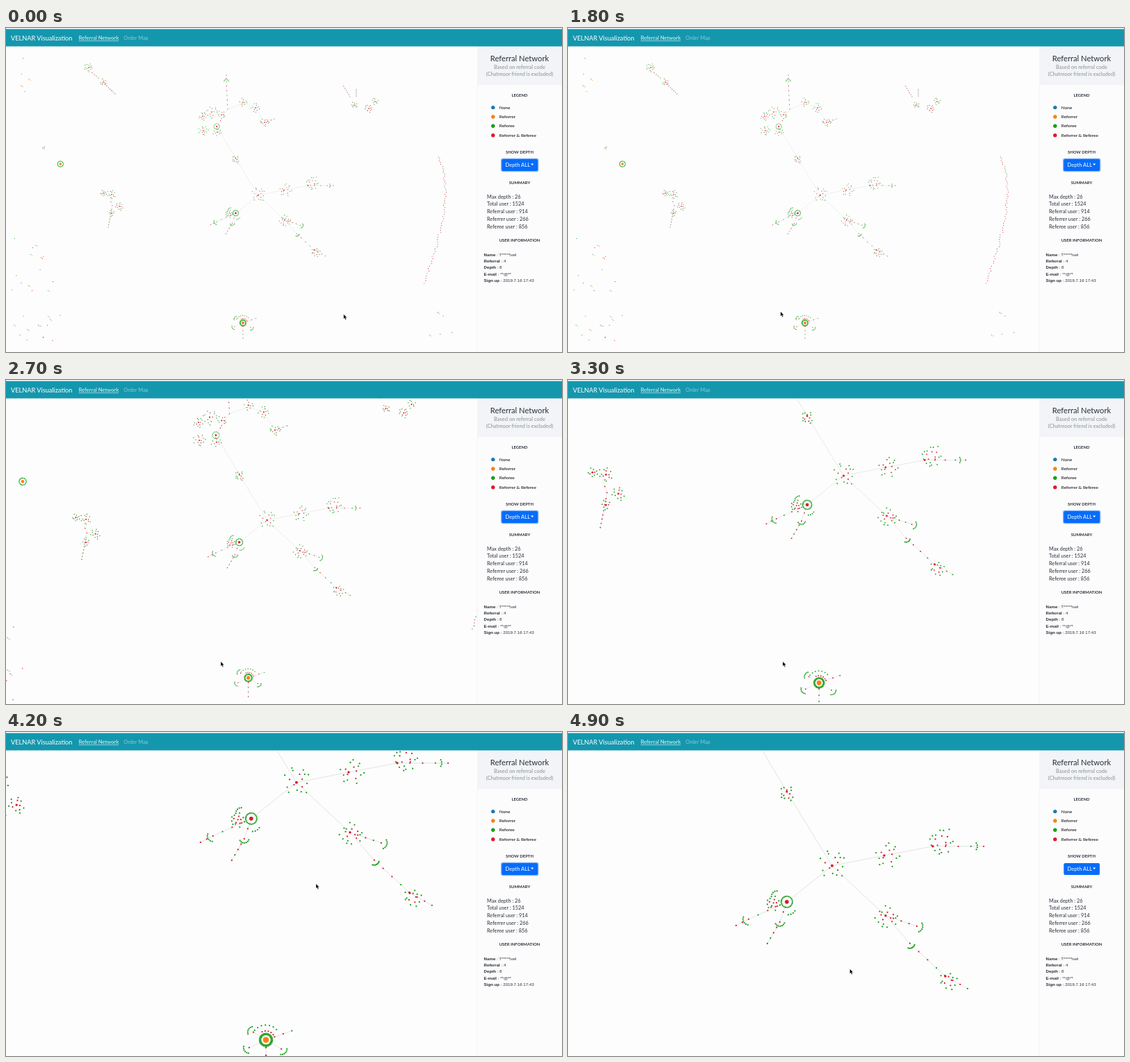
An HTML page for the animation above (5000 ms loop, 800x467 px).

```html
<!DOCTYPE html>
<html lang="en">
<head>
<meta charset="utf-8">
<title>Referral Network</title>
<style>
  html, body { margin: 0; width: 100%; height: 100%; overflow: hidden; background: #fff; }
  svg { display: block; width: 100%; height: 100%; }
  text { font-family: Lato, "Open Sans", sans-serif; fill: #2a2f38; white-space: pre; }
  .user text { font-family: "Liberation Sans", Arial, sans-serif; }
  .link { stroke: #d9d9d9; stroke-width: .36; }
</style>
</head>
<body>
<svg viewBox="0 0 800 467">
  <rect y="26" width="678" height="441" fill="#fdfdfd"/>
  <g id="network"><g id="links"></g><g id="nodes"></g></g>
  <rect width="800" height="26.5" fill="#fff"/>
  <rect x="678" y="26" width="122" height="441" fill="#fcfcfd"/>
  <rect x="678" y="26" width="122" height="56" fill="#f2f4f7"/>
  <rect y="1.5" width="800" height="25" fill="#1497ad"/>
  <path d="M678 82V467" stroke="#f0f1f3" stroke-width=".8"/>
  <g id="panel"></g>
  <rect id="focus" x="712" y="187.8" width="54.4" height="19.4" rx="3" fill="#80b5fd"/>
  <rect x="713.3" y="189" width="51.8" height="17" rx="2" fill="#066cfb"/>
  <text x="718.5" y="200" font-size="7.6" style="fill:#fff">Depth ALL</text>
  <path d="M755 195.6h4.4l-2.2 2.3z" fill="#fff"/>
  <path id="cursor" d="M0 0V6.8L1.5 5.4L2.6 8L3.8 7.5L2.8 5H4.9Z" fill="#000" stroke="#fff" stroke-width=".35"/>
</svg>
<script>
const $ = id => document.getElementById(id);
const BLUE = '#1f77b4', ORANGE = '#ff7f0e', GREEN = '#189e1c', RED = '#d91c2b';
const GOLDEN_ANGLE = 2.4;
const links = [], nodes = [];

let seed = 11;
const random = () => (seed = seed * 16807 % 2147483647) / 2147483647;
const between = (a, b) => a + (b - a) * random();

function dot(x, y, color, r = .56) {
  nodes.push(`<circle cx="${x.toFixed(2)}" cy="${y.toFixed(2)}" r="${r}" fill="${color}"/>`);
}

// Followers along an arc; angles in degrees.
function fan(x, y, r, middle, spread, n, color = GREEN) {
  for (let i = 0; i < n; i++) {
    const a = (middle + spread * (i / (n - 1) - .5)) * Math.PI / 180;
    dot(x + r * Math.cos(a), y + r * Math.sin(a), color);
  }
}

function ring(x, y, r, n, hub, color = RED) {
  fan(x, y, r, 0, 360 - 360 / n, n);
  dot(x, y, color, hub);
}

// A hub with red members close by and green ones around them.
function burst(x, y, radius, n, lean = 0, shift = 0, hub = .85) {
  const a0 = lean * Math.PI / 180;
  const cx = x + shift * Math.cos(a0), cy = y + shift * Math.sin(a0);
  for (let i = 0; i < n; i++) {
    const a = i * GOLDEN_ANGLE + between(-.3, .3);
    const d = radius * Math.sqrt((i + 2) / (n + 1)) * between(.88, 1.12);
    dot(cx + d * Math.cos(a), cy + d * Math.sin(a), i < n * .28 ? RED : GREEN);
  }
  dot(x, y, RED, hub);
}

// A link with n members spaced along it.
function chain(x1, y1, x2, y2, n = 0) {
  links.push(`<path class="link" d="M${x1} ${y1}L${x2} ${y2}"/>`);
  for (let i = 1; i <= n; i++) {
    dot(x1 + (x2 - x1) * i / n, y1 + (y2 - y1) * i / n, i % 3 ? RED : GREEN);
  }
}

// Central tree
const core = [362.8, 241];
burst(...core, 10.5, 17, -60, 1.5, 1);

chain(...core, 400, 233.6);
burst(400, 233.6, 9, 16, 0, 2.5);
chain(400, 233.6, 434.7, 227.1);
burst(434.7, 227.1, 9.5, 20, -30, 7);
chain(434.7, 227.1, 471, 227.1, 4);
fan(462.5, 227.1, 4, 0, 70, 4);

chain(...core, 401, 276.7);
burst(401, 276.7, 8.5, 18, 50, 1.5);
chain(401, 276.7, 423.3, 284.2, 4);
fan(423.3, 284.2, 4.2, 20, 100, 6);
chain(401, 276.7, 418.3, 296.5, 1);
fan(418.3, 296.5, 3.5, 62, 95, 7);
chain(418.3, 296.5, 443.6, 319.9, 4);
burst(443.6, 319.9, 6.5, 14, 60, 4);
chain(443.6, 319.9, 459.5, 328.8, 3);

chain(...core, 330.5, 266.8);
ring(330.5, 266.8, 4, 21, 1.4);
burst(321, 267.5, 5.5, 15, 0, 0, .56);
fan(323.5, 263, 4, 225, 90, 5);
fan(331.5, 270.5, 5.5, 60, 60, 4);
chain(330.5, 266.8, 303.2, 279.2, 4);
fan(303.2, 279.2, 4, 150, 105, 6);
chain(303.2, 279.2, 294.3, 283.7, 2);
chain(330.5, 266.8, 325.5, 281.2, 2);
fan(325.5, 280.7, 3.5, 85, 130, 7);
chain(325.5, 281.2, 316.6, 296.6, 4);

chain(...core, 330.5, 188);
burst(330.5, 188, 5.5, 13, 90, 1.5, .8);
chain(330.5, 188, 303.2, 142);

// Upper branch
ring(303.2, 142, 4, 13, 1.1);
burst(296, 121, 9, 14);
burst(283, 127, 6, 12);
burst(284, 148, 7, 14);
burst(304, 150, 6, 10);
burst(310, 125, 6, 9);
chain(303.2, 142, 319, 117, 3);
chain(319, 117, 317, 77, 6);
fan(317, 77, 3.2, 270, 180, 7);
chain(317, 77, 317, 68, 2);
chain(319, 117, 341, 109);
burst(341, 107, 6, 9);
chain(341, 109, 358, 115);
burst(359, 115, 7, 12);
chain(358, 115, 372, 135);
burst(372, 136, 6.5, 14);
chain(372, 136, 386, 131, 3);

// Bottom fan: a double ring with five arms
const base = [341, 425];
ring(...base, 4.6, 27, 2.1, ORANGE);
fan(...base, 3.8, 0, 345, 24);
fan(...base, 10.6, 268, 95, 7);
fan(...base, 6.4, 285, 80, 5, RED);
for (const [dx, dy, facing] of [[-12, 5.5, 145], [11, 6.5, 48], [-9, -5.5, 210]]) {
  const x = base[0] + dx, y = base[1] + dy;
  chain(...base, x, y, 1);
  fan(x, y, 4, facing, 95, 6);
}
chain(...base, 341, 447, 4);
chain(...base, 359.5, 418.5, 3);

// Left side
ring(78.3, 196, 4.1, 27, 1.8, ORANGE);
burst(140, 238, 4.5, 9);
burst(152, 240, 6.5, 13);
chain(149, 245, 153, 256, 2);
burst(163, 257, 6, 12);
chain(153, 256, 150, 272, 3);
burst(152, 267, 4.5, 8);
chain(150, 272, 147, 287, 4);

// Top groups
burst(119, 57, 6, 13);
chain(121, 62, 133, 72, 4);
burst(140, 78, 5, 10);
chain(140, 79, 157, 95, 7);
chain(484, 81, 495, 99, 6);
chain(504, 86, 504, 98, 4);
burst(501, 111, 4.5, 9);
burst(522, 116, 6, 13);
burst(531, 106, 5, 8);

// Long chain on the right
for (let i = 0, n = 58; i < n; i++) {
  const t = i / (n - 1), u = 1 - t;
  const bezier = (a, b, c, d) => u * u * u * a + 3 * u * u * t * b + 3 * u * t * t * c + t * t * t * d;
  dot(bezier(622, 645, 625, 602) + between(-1.7, 1.7), bezier(186, 235, 300, 368), i % 4 == 1 ? GREEN : RED);
}

// Loose users, mostly in pairs
function loose(left, top, right, bottom, n) {
  for (let i = 0; i < n; i++) {
    const x = between(left, right), y = between(top, bottom);
    dot(x, y, i % 2 ? RED : GREEN);
    if (i % 3 == 0) dot(x + 2, y + 1.5, ORANGE);
  }
}
loose(20, 36, 38, 105, 5);
loose(52, 168, 56, 179, 3);
loose(8, 300, 70, 392, 15);
loose(8, 412, 88, 458, 14);
loose(588, 408, 655, 466, 5);

$('links').innerHTML = links.join('');
$('nodes').innerHTML = nodes.join('');

// Header and side panel text
const text = (x, y, size, body, attrs = '') => `<text x="${x}" y="${y}" font-size="${size}" ${attrs}>${body}</text>`;
const centered = (y, size, body, attrs = '') => text(739, y, size, body, 'text-anchor="middle" ' + attrs);
const title = (y, body) => centered(y, 5.95, body, 'font-weight="700"');
const gray = 'style="fill:#8b8f94"';
const legend = [['None', BLUE], ['Referrer', ORANGE], ['Referee', GREEN], ['Referrer &amp; Referee', RED]];
const summary = ['Max depth : 26', 'Total user : 1524', 'Referral user : 914', 'Referrer user : 266', 'Referee user : 856'];
const user = [['Name', 'T*****ivel'], ['Referral', 4], ['Depth', 8], ['E-mail', '**@**'], ['Sign up', '2019.7.16 17:43']];

$('panel').innerHTML =
  text(7, 18, 9.2, 'VELNAR Visualization', 'style="fill:#fff"') +
  text(104.5, 17.3, 7.5, 'Referral Network', 'font-weight="700" text-decoration="underline" style="fill:#b9e0e7"') +
  text(169.3, 17.3, 7.4, 'Order Map', 'style="fill:#8accd7"') +
  centered(48, 11.2, 'Referral Network') +
  centered(58.6, 7.5, 'Based on referral code', gray) +
  centered(69, 7.5, '(Chatmoor friend is excluded)', gray) +
  title(99.4, 'LEGEND') + title(181, 'SHOW DEPTH') + title(224.5, 'SUMMARY') + title(308, 'USER INFORMATION') +
  legend.map(([name, color], i) =>
    `<circle cx="700.8" cy="${114.6 + i * 13.35}" r="2.7" fill="${color}"/>` +
    text(709.8, 116.6 + i * 13.35, 6.5, name, 'style="fill:#000"')).join('') +
  summary.map((row, i) => text(692, 245.6 + i * 10.75, 7.3, row)).join('') +
  '<g class="user">' + user.map(([key, value], i) =>
    text(687.6, 328.5 + i * 9.4, 6.15, `<tspan font-weight="700">${key}</tspan> : ${value}`)).join('') + '</g>';

// Motion
const progress = (t, from, to) => Math.min(1, Math.max(0, (t - from) / (to - from)));
const smooth = u => u * u * (3 - 2 * u);
const ZOOM = 2.016, DRAG_START = 4300, DRAG_END = 4900;
const anchor = { x: 308.5, y: 406.5 };

function render(time) {
  const t = Math.floor(time % 5000 / 100) * 100;
  const k = ZOOM ** progress(t, 2233, 3779);
  const drag = progress(t, DRAG_START, DRAG_END);
  const tx = anchor.x * (1 - k) - 38 * drag ** 2.3;
  const ty = anchor.y * (1 - k) + 120 * drag ** 1.55;
  $('network').setAttribute('transform', `translate(${tx} ${ty}) scale(${k})`);

  const sweep = smooth(progress(t, 1200, 1800));
  const settle = progress(t, 1800, 2000);
  const lift = smooth(progress(t, 3800, 4200));
  const cx = 485.8 - 180 * sweep + 3.2 * settle + 137 * lift - 40.5 * drag ** 1.5;
  const cy = 412.5 - 3.8 * sweep + 9 * Math.sin(Math.PI * sweep) - 3 * settle - 187 * lift + 122.8 * drag ** 1.15;
  $('cursor').setAttribute('transform', `translate(${cx} ${cy})`);
  $('focus').setAttribute('opacity', t > DRAG_START ? 0 : 1);
}

const start = performance.now();
(function tick() {
  render(performance.now() - start);
  requestAnimationFrame(tick);
})();
</script>
</body>
</html>
```
